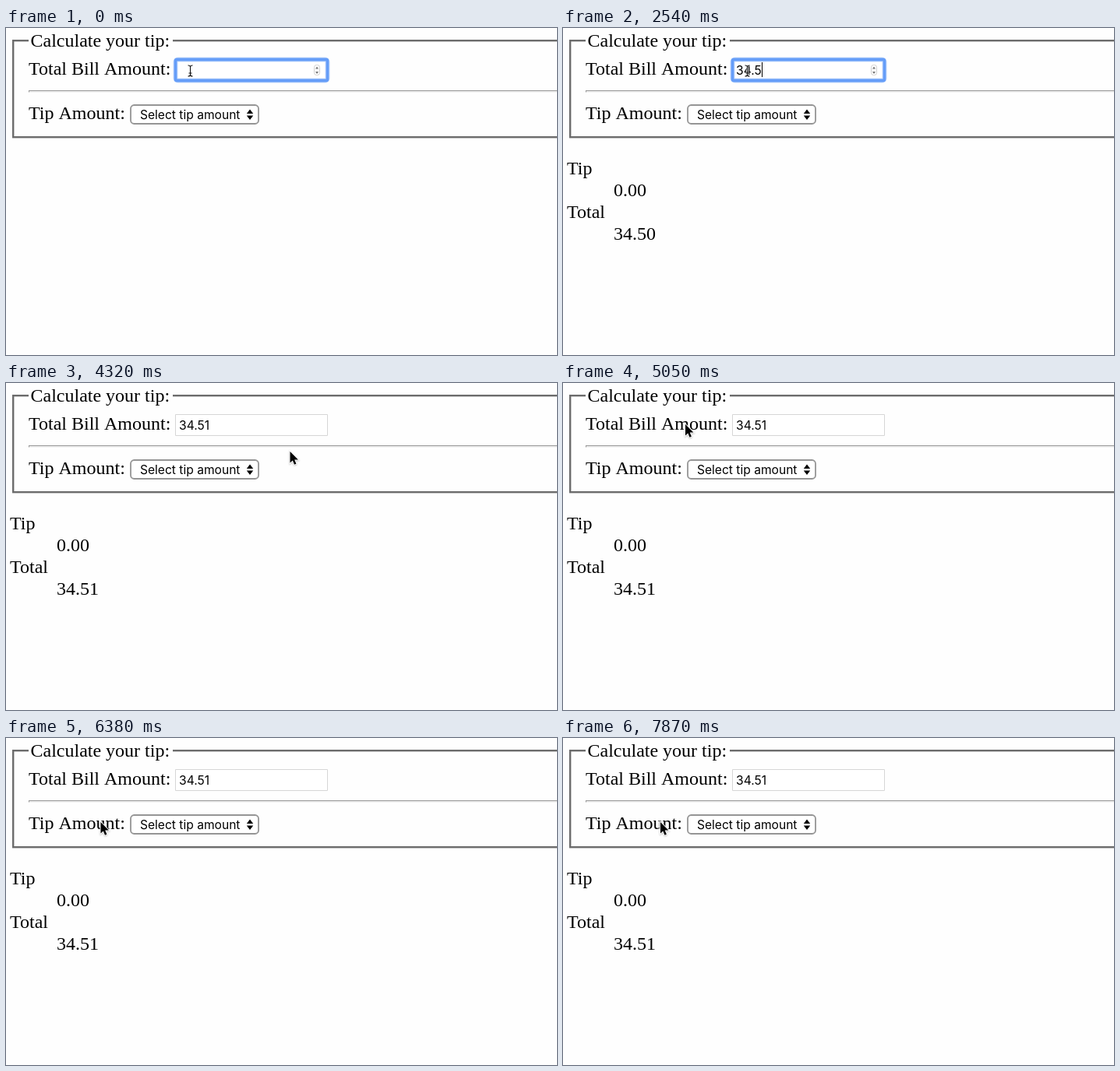
Recreate the animation shown at these times as an HTML page with a canvas. Size 707x420 px, loop 8000 ms.

```html
<!DOCTYPE html>
<html lang="en">
<head>
<meta charset="utf-8">
<title>Tip calculator</title>
<style>
html, body { margin: 0; width: 100%; height: 100%; overflow: hidden; background: #fefefe; }
canvas { display: block; }
</style>
</head>
<body>
<canvas id="stage" width="707" height="420"></canvas>
<script>
const ctx = document.getElementById('stage').getContext('2d');
const LOOP = 8000;
const SERIF = '24px "Liberation Serif", serif';
const SANS = '15.6px Inter, sans-serif';

// Each track lists [start time, value]; a value holds until the next start.
const typed = [[0, ''], [1500, '3'], [1790, '34'], [2240, '34.'], [2540, '34.5'], [2840, '34.51']];
const caret = [[0, false], [450, true], [900, false], [1500, true], [3290, false],
  [3740, true], [4170, false], [5200, true], [5650, false]];
const focus = [[0, 'input'], [4320, ''], [5200, 'input'], [5940, ''], [6680, 'select'], [7430, '']];
const pointer = [[0, null],
  [3590, [240, 73]], [3740, [276, 92]], [3890, [322, 100]], [4030, [352, 97]], [4170, [364.5, 88]],
  [4610, [335, 80]], [4760, [262, 66]], [4910, [190, 56]], [5050, [157, 53]],
  [5650, [157, 62]], [5790, [156, 77]], [6080, [145, 91]], [6230, [128, 104]], [6380, [121.5, 108]],
  [7130, [127, 95]], [7280, [134, 81.5]], [7720, [130, 96]], [7870, [125, 108]]];

const at = (track, t) => track.findLast(([start]) => start <= t)[1];

function text(str, x, y, font = SERIF) {
  ctx.font = font;
  ctx.fillStyle = '#000';
  ctx.fillText(str, x, y);
}

function rect(color, x, y, w, h) {
  ctx.fillStyle = color;
  ctx.fillRect(x, y, w, h);
}

function box(x, y, w, h, r, color, width) {
  ctx.beginPath();
  ctx.roundRect(x, y, w, h, r);
  ctx.strokeStyle = color;
  ctx.lineWidth = width;
  ctx.stroke();
}

function poly(points, color) {
  ctx.beginPath();
  points.forEach(([x, y]) => ctx.lineTo(x, y));
  ctx.closePath();
  ctx.fillStyle = color;
  ctx.fill();
}

function ring(x, y, w, h, r) {
  box(x, y, w, h, r + 1, 'rgba(92,152,247,.35)', 6);
  box(x, y, w, h, r, '#659df8', 3.8);
}

function drawForm() {
  const line = '#6c6c6c';
  rect(line, 8, 15, 21, 2.4);
  rect(line, 214, 15, 493, 2.4);
  rect(line, 8, 15, 2.4, 126);
  rect(line, 8, 139, 699, 2.4);
  rect('#9a9a9a', 29, 80, 678, 1.2);
  rect('#9a9a9a', 29, 80, 1, 2.5);
  rect('#ececec', 30, 81.3, 677, 1.3);
  text('Calculate your tip:', 31.5, 24);
  text('Total Bill Amount:', 29, 60);
  text('Tip Amount:', 29, 117);
}

function drawInput(value, focused, caretOn) {
  rect('#fff', 217, 40, 196, 28);
  box(217.5, 40.5, 195, 27, 0, '#d6d6d6', 1);
  if (focused) {
    ring(217.5, 40.5, 195, 27, 2);
    box(395.5, 47.5, 7, 13, 3, '#d0d0d0', 1);
    poly([[399, 49.5], [401, 52.5], [397, 52.5]], '#777');
    poly([[397, 56], [401, 56], [399, 59]], '#777');
  }
  text(value, 222, 60, SANS);
  if (focused && caretOn) rect('#000', 222 + Math.round(ctx.measureText(value).width), 44, 1, 19);
}

function drawSelect(focused) {
  if (focused) ring(160, 99, 164, 24, 5);
  rect('#fff', 161, 100, 162, 22);
  box(160, 99, 164, 24, 4.5, focused ? '#7ea6e8' : '#959595', 1.8);
  text('Select tip amount', 172, 117, SANS);
  poly([[313, 104.5], [317.2, 110], [308.8, 110]], '#000');
  poly([[308.8, 112.5], [317.2, 112.5], [313, 118]], '#000');
}

function drawResult(value) {
  if (!value) return;
  text('Tip', 5, 188);
  text('0.00', 65, 216);
  text('Total', 5, 244);
  text(Number(value).toFixed(2), 65, 272);
}

function drawBeam(x, y) {
  const beam = new Path2D(`M${x - 3} ${y - 7}q3 0 3 2v10q0 2-3 2m6 0q-3 0-3-2v-10q0-2 3-2m-5 10h4`);
  ctx.strokeStyle = 'rgba(255,255,255,.8)';
  ctx.lineWidth = 2.4;
  ctx.stroke(beam);
  ctx.strokeStyle = '#111';
  ctx.lineWidth = 1.1;
  ctx.stroke(beam);
}

function drawArrow(x, y) {
  const arrow = new Path2D(`M${x} ${y}v14.6l3.3-3.1 2.2 5.2 2.4-1-2.2-5.1h4.7z`);
  ctx.save();
  ctx.shadowColor = 'rgba(0,0,0,.3)';
  ctx.shadowBlur = 2;
  ctx.shadowOffsetY = 0.7;
  ctx.strokeStyle = '#fff';
  ctx.lineWidth = 1.8;
  ctx.stroke(arrow);
  ctx.restore();
  ctx.fillStyle = '#000';
  ctx.fill(arrow);
}

function draw(now) {
  const t = now % LOOP;
  const value = at(typed, t), focused = at(focus, t), tip = at(pointer, t);
  rect('#fefefe', 0, 0, 707, 420);
  drawForm();
  drawInput(value, focused === 'input', at(caret, t));
  drawSelect(focused === 'select');
  drawResult(value);
  if (tip) drawArrow(...tip);
  else drawBeam(236.5, 55);
}

const start = performance.now();
function tick() {
  draw(performance.now() - start);
  requestAnimationFrame(tick);
}
tick();
</script>
</body>
</html>
```
